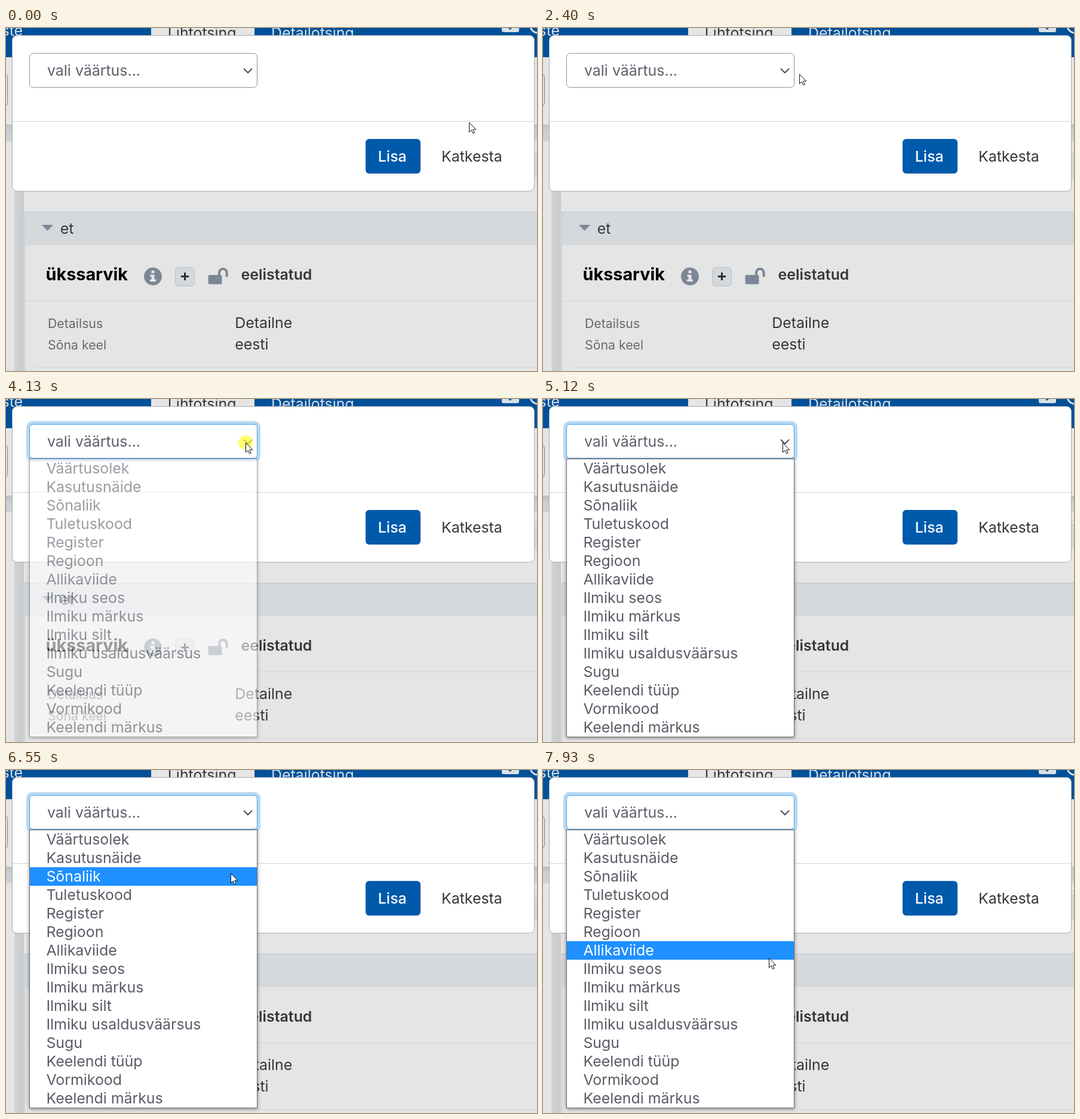
These frames come from a looping animation (889x575 px, 8000 ms). An HTML page:

```html
<!DOCTYPE html>
<html lang="et">
<head>
<meta charset="utf-8">
<style>
html, body { margin: 0; width: 100%; height: 100%; overflow: hidden; background: #e5e5e5; }
svg, #list { position: absolute; box-sizing: border-box; }
svg { left: 0; top: 0; }
text, #list { font: 24.9px Inter, sans-serif; }
text { fill: #36363b; }
.white { fill: #fff; }
.dim { fill: #5f5f6c; }
.small { font-size: 21.3px; fill: #65696f; }
.tab { fill: #d8e0e8; }
#list { left: 39px; top: 100px; width: 382px; height: 467px; border: 1px solid transparent;
  box-shadow: 0 1px 6px rgba(0,0,0,.45); color: #5b5b68; }
#list div { height: 31px; line-height: 30px; padding-left: 27.4px; white-space: pre; }
#list .on { background: #1e90ff; color: #fff; }
</style>
</head>
<body>
<svg width="889" height="575" viewBox="0 0 889 575">
  <defs>
    <linearGradient id="band" x2="0" y2="1">
      <stop stop-color="#bcc0c4"/><stop offset=".35" stop-color="#cbced1"/><stop offset="1" stop-color="#d0d3d5"/>
    </linearGradient>
    <linearGradient id="gutter">
      <stop stop-color="#d0d3d5"/><stop offset="1" stop-color="#c8cbce"/>
    </linearGradient>
  </defs>
  <rect width="889" height="575" fill="#e5e5e5"/>
  <rect width="889" height="49" fill="#00519a"/>
  <rect x="243" width="173" height="49" fill="#e5e5e5"/>
  <text x="-7.5" y="13" class="tab">ste</text>
  <text x="270.8" y="17">Lihtotsing</text>
  <text x="444" y="17" class="tab">Detailotsing</text>
  <rect x="830" y="-16" width="29" height="23" rx="3" fill="#d8e0e8"/>
  <path d="M841 0h6l-3 3z" fill="#00519a"/>
  <circle cx="890" cy="-4" r="12" fill="none" stroke="#d8e0e8" stroke-width="3"/>
  <rect x="-20" y="76.5" width="22.5" height="55" rx="6" fill="#e5e5e5" stroke="#7d848c"/>
  <rect y="162" width="889" height="28" fill="url(#band)"/>
  <rect x="14" y="190" width="16" height="385" fill="url(#gutter)"/>
  <path d="M884 203.5h5M884 209.5h5" stroke="#c3c9ce"/>
  <rect x="884" y="210" width="5" height="42" fill="#d5d9dc"/>

  <rect x="31" y="308" width="858" height="56" fill="#d5d9dc"/>
  <path d="M31.5 575V308.5H889" fill="none" stroke="#bcc5cc"/>
  <path d="M33 457.5H889M47 569.5H889" stroke="#d0d4d8"/>
  <path d="M60 330h19l-9.500 10z" fill="#7c8796"/>
  <text x="90.700" y="345">et</text>
  <text x="66.500" y="423" style="font-size:28.800px;font-weight:700;fill:#000">ükssarvik</text>
  <text x="393.500" y="422" style="font-weight:600">eelistatud</text>

  <circle cx="246" cy="416.500" r="15" fill="#7c8796"/>
  <path d="M243.500 406.500h5v4.500h-5zM241.500 413.500h7v8h2.500v3.500h-10v-3.500h2.500v-4.500h-2z" fill="#e5e5e5"/>
  <rect x="283.500" y="401.500" width="32" height="31" rx="5" fill="#d3d8dc" stroke="#b9c1c8"/>
  <path d="M293 416.500h13M299.500 410v13" stroke="#2b2b2f" stroke-width="3"/>
  <rect x="338.500" y="414" width="23" height="15.500" rx="2.500" fill="#7c8796"/>
  <path d="M357 415v-5a6.300 6.300 0 0 1 12.600 0v5.500" fill="none" stroke="#7c8796" stroke-width="4" stroke-linecap="round"/>

  <text x="70" y="503" class="small">Detailsus</text>
  <text x="70" y="539" class="small">Sõna keel</text>
  <text x="383.300" y="503">Detailne</text>
  <text x="383.300" y="539">eesti</text>

  <rect x="10.500" y="12.500" width="874" height="261" rx="8" fill="#fff" stroke="#a9aeb3"/>
  <path d="M11 156.500H884" stroke="#cdd7de"/>
  <rect x="602" y="186" width="92" height="58" rx="6" fill="#005aab"/>
  <text x="622.800" y="224" class="white" style="font-weight:500">Lisa</text>
  <text x="729" y="224">Katkesta</text>

  <rect id="ring" x="34" y="37" width="392" height="68" rx="10" fill="#b9d9f0"/>
  <rect id="field" x="39.500" y="42.500" width="381" height="57" rx="6" fill="#fff"/>
  <text x="69" y="80" class="dim">vali väärtus...</text>
  <path d="M398.500 68.500l6.500 6.500 6.500-6.500" fill="none" stroke="#4a4f58" stroke-width="2" stroke-linecap="round"/>
</svg>
<div id="list"></div>
<svg width="889" height="575" viewBox="0 0 889 575">
  <circle id="click" cx="401" cy="73" r="12" fill="#ffff2e" opacity=".7"/>
  <path id="cursor" d="M.5.5v16l3.700-3.500 2.500 5.700 2.500-1.100-2.400-5.500h5z" fill="#fff" stroke="#111"/>
</svg>
<script>
const LOOP = 8000, STEP = 69.2, ROW = 31, LIST_TOP = 101;
const OPEN = 4060, SOLID = 4120, READY = 4185, CLICK_END = 5120;
const names = ['Väärtusolek', 'Kasutusnäide', 'Sõnaliik', 'Tuletuskood', 'Register', 'Regioon',
  'Allikaviide', 'Ilmiku seos', 'Ilmiku märkus', 'Ilmiku silt', 'Ilmiku usaldusväärsus',
  'Sugu', 'Keelendi tüüp', 'Vormikood', 'Keelendi märkus'];
// pointer path: time, x, y
const path = [[0, 775, 158], [450, 775, 158], [1280, 601, 107], [2120, 469, 83], [2400, 427, 77],
  [2870, 402, 73], [3000, 401, 73], [5710, 401, 73], [6550, 376, 174], [7030, 376, 235],
  [7380, 376, 268], [7930, 378, 315], [LOOP, 378, 315]];

const $ = id => document.getElementById(id);
const list = $('list');
const rows = names.map(name => {
  const row = document.createElement('div');
  row.textContent = name;
  return list.appendChild(row);
});
const show = (el, on) => { el.style.visibility = on ? 'visible' : 'hidden'; };

function pointer(t) {
  const i = Math.max(1, path.findIndex(p => p[0] >= t));
  const [a, b] = [path[i - 1], path[i]];
  const u = (t - a[0]) / (b[0] - a[0]);
  return [1, 2].map(k => Math.round(a[k] + (b[k] - a[k]) * u));
}

function draw(t) {
  // the pointer is sampled at a fixed rate
  const sampled = 520 + Math.floor((t - 512) / STEP) * STEP;
  const [x, y] = pointer(Math.min(LOOP, Math.max(0, sampled)));
  $('cursor').setAttribute('transform', `translate(${x} ${y})`);

  const open = t >= OPEN, solid = t >= SOLID;
  show(list, open);
  show($('ring'), solid);
  show($('click'), open && t < CLICK_END);
  $('field').setAttribute('stroke', solid ? '#3f9fee' : '#8b919b');
  list.style.opacity = solid && t < READY ? 0.6 : 1;
  list.style.background = solid ? '#fff' : 'rgba(255,255,255,.12)';
  list.style.borderColor = solid ? '#6e6e72' : 'transparent';
  const active = y >= LIST_TOP && open ? Math.floor((y - LIST_TOP) / ROW) : -1;
  rows.forEach((row, i) => {
    row.className = i === active ? 'on' : '';
    row.style.display = solid ? '' : 'none';
  });
}

function tick(now) {
  draw(now % LOOP);
  requestAnimationFrame(tick);
}
draw(0);
requestAnimationFrame(tick);
</script>
</body>
</html>
```
